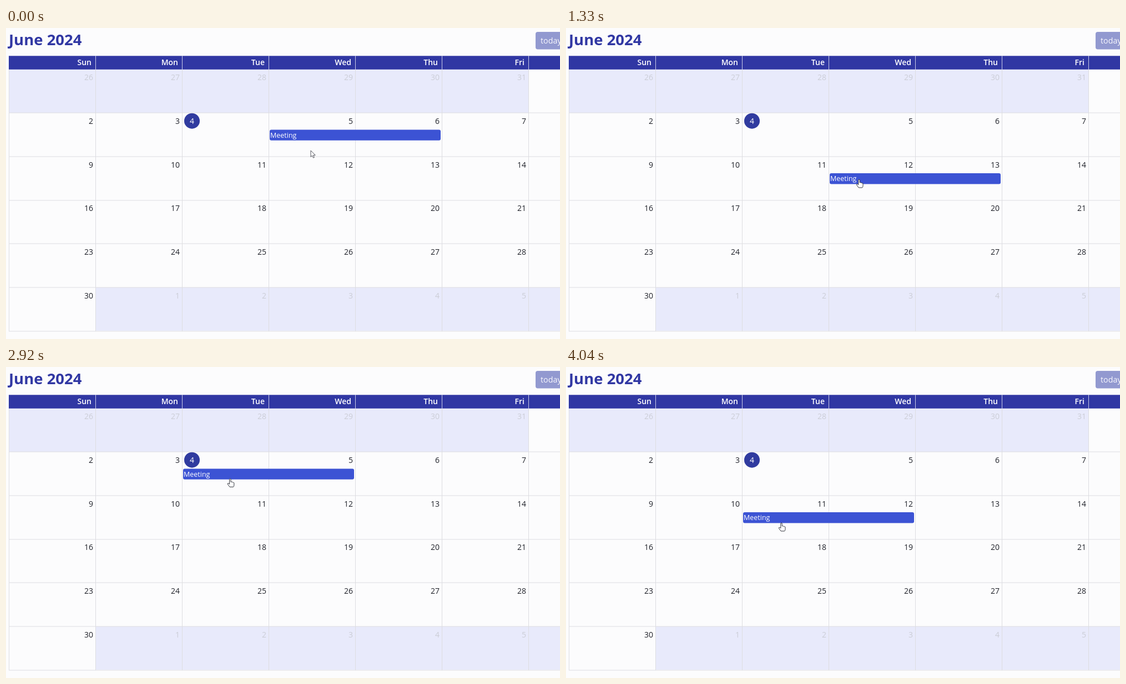
An HTML page with a canvas for the animation above (4080 ms loop, 998x561 px).

```html
<!DOCTYPE html>
<html lang="en">
<head>
<meta charset="utf-8">
<title>Calendar drag</title>
<style>
html, body { margin: 0; width: 100%; height: 100%; overflow: hidden; background: #fcfcfd; }
canvas { display: block; }
</style>
</head>
<body>
<canvas id="stage" width="998" height="561"></canvas>
<script>
const ctx = document.getElementById('stage').getContext('2d');
const FONT = '"Open Sans", "Noto Sans", sans-serif';
const NAVY = '#3037a3', LINE = '#dddde1', MUTED = '#e8eafb';
const LOOP = 4080;
const COL = 156, ROW = 78.7, TOP = 74.5, LEFT = 5;
const BAR_W = 308, BAR_H = 19.3;
const MOVE = 290;      // duration of every pointer move
const BAR_LAG = 45;    // the dragged bar trails the pointer
const HIT_LAG = 75;    // the drop area trails a little more

const REST = { x: 549, y: 221 };
const MOVES = [
  { at: 330, x: 551, y: 194 },
  { at: 737, x: 515, y: 273 },
  { at: 1030, x: 528, y: 273 },
  { at: 1837, x: 404, y: 203 },
  { at: 2127, x: 404, y: 198 },
  { at: 2886, x: 400, y: 282 },
  { at: 3190, x: 388, y: 281 }
];
const DRAGS = [
  { grab: 737, drop: 1230 },
  { grab: 1837, drop: 2520 },
  { grab: 2886, drop: 3500 }
];

const colX = c => LEFT + COL * c;
const rowY = r => TOP + ROW * r;
const smooth = u => u * u * (3 - 2 * u);

function pointerAt(t) {
  let { x, y } = REST;
  for (const m of MOVES) {
    const k = smooth(Math.min(1, Math.max(0, (t - m.at) / MOVE)));
    x += (m.x - x) * k;
    y += (m.y - y) * k;
  }
  return { x, y };
}

const cellAt = p => ({
  c: Math.floor((p.x - LEFT) / COL),
  r: Math.floor((p.y - TOP) / ROW)
});

// The event shifts by as many cells as the pointer has crossed
function shifted(cell, drag, t) {
  const a = cellAt(pointerAt(drag.grab)), b = cellAt(pointerAt(t));
  return { c: cell.c + b.c - a.c, r: cell.r + b.r - a.r };
}

function eventAt(t) {
  let cell = { c: 3, r: 1 };
  for (const drag of DRAGS) {
    if (t < drag.grab + BAR_LAG) break;
    const x = colX(cell.c) + 2, y = rowY(cell.r) + 30.2;
    if (t < drag.drop) {
      const a = pointerAt(drag.grab), b = pointerAt(t - BAR_LAG);
      return {
        x: x + b.x - a.x,
        y: y + b.y - a.y,
        target: shifted(cell, drag, t - HIT_LAG)
      };
    }
    cell = shifted(cell, drag, drag.drop);
  }
  return { x: colX(cell.c) + 2, y: rowY(cell.r) + 30.2 };
}

function rect(x, y, w, h, color) {
  ctx.fillStyle = color;
  ctx.fillRect(x, y, w, h);
}

function pill(x, y, w, h, r, color) {
  ctx.fillStyle = color;
  ctx.beginPath();
  ctx.roundRect(x, y, w, h, r);
  ctx.fill();
}

function text(s, x, y, size, color, weight = 400, align = 'left') {
  ctx.font = `${weight} ${size}px ${FONT}`;
  ctx.textAlign = align;
  ctx.fillStyle = color;
  ctx.fillText(s, x, y);
}

function drawCells() {
  rect(0, 0, 998, 561, '#fcfcfd');
  rect(LEFT, 75, 6 * COL, 78, MUTED);
  rect(colX(1), 468, 998, 78, MUTED);
  for (let r = 1; r < 7; r++) rect(LEFT, Math.round(rowY(r)) - 0.5, 998, 1, LINE);
  for (let c = 0; c < 7; c++) rect(colX(c), 75, 1, 472, LINE);
  pill(321, 153.7, 28, 28, 14, '#303b9f');
}

function drawLabels() {
  for (let r = 0; r < 6; r++) {
    for (let c = 0; c < 6; c++) {
      const date = new Date(2024, 4, 26 + r * 7 + c);
      const day = date.getDate(), june = date.getMonth() === 5;
      const y = rowY(r) + 19.7;
      if (june && day === 4) text(day, 335, y, 14, '#fff', 500, 'center');
      else text(day, colX(c + 1) - 4, y, 14, june ? '#20222a' : '#cbcdd6', 500, 'right');
    }
  }
}

function drawHeader() {
  text('June 2024', 5, 31, 27.5, NAVY, 700);
  pill(954, 7, 60, 31.5, 4, '#9299d0');
  text('today', 963, 27.5, 14.3, '#f8f8fd', 500);
  rect(LEFT, 50.3, 998, 24.5, NAVY);
  ['Sun', 'Mon', 'Tue', 'Wed', 'Thu', 'Fri'].forEach((name, c) => {
    text(name, colX(c + 1) - 7, 67, 14, '#fff', 600, 'right');
    rect(colX(c + 1), 50, 1, 25, '#c9cbe6');
  });
}

function drawPointer(x, y, hand) {
  const shape = new Path2D(hand
    ? 'M-1.2 1Q0 -1 1.2 1V6Q2.6 5 3.4 6.4Q4.8 5.6 5.4 7Q7 6.6 7 8.2V11.5Q7 13.5 5.7 15H-.8L-4.6 9.8Q-4.8 7.7-2.6 8.6L-1.2 10Z'
    : 'M0 0V11.5L2.6 9.1L4.5 13.2L6.4 12.4L4.6 8.4H8.2Z');
  ctx.save();
  ctx.translate(x, y);
  ctx.fillStyle = '#fff';
  ctx.strokeStyle = hand ? '#33353d' : '#55575f';
  ctx.lineWidth = 1;
  ctx.lineJoin = 'round';
  ctx.fill(shape);
  ctx.stroke(shape);
  ctx.restore();
}

function draw(t) {
  const { x, y, target } = eventAt(t), p = pointerAt(t);
  drawCells();
  if (target) rect(colX(target.c), rowY(target.r), 2 * COL, ROW, 'rgba(188,232,241,.3)');
  drawLabels();
  drawHeader();
  pill(x, y, BAR_W, BAR_H, 3, target ? 'rgba(60,83,212,.77)' : '#3c53d4');
  text('Meeting', x + 1, y + 14.3, 12.5, '#fff', 500);
  const over = p.x > x && p.x < x + BAR_W && p.y > y && p.y < y + BAR_H;
  drawPointer(p.x, p.y, over);
}

const begin = performance.now();
function tick() {
  draw((performance.now() - begin) % LOOP);
  requestAnimationFrame(tick);
}
tick();
</script>
</body>
</html>
```
